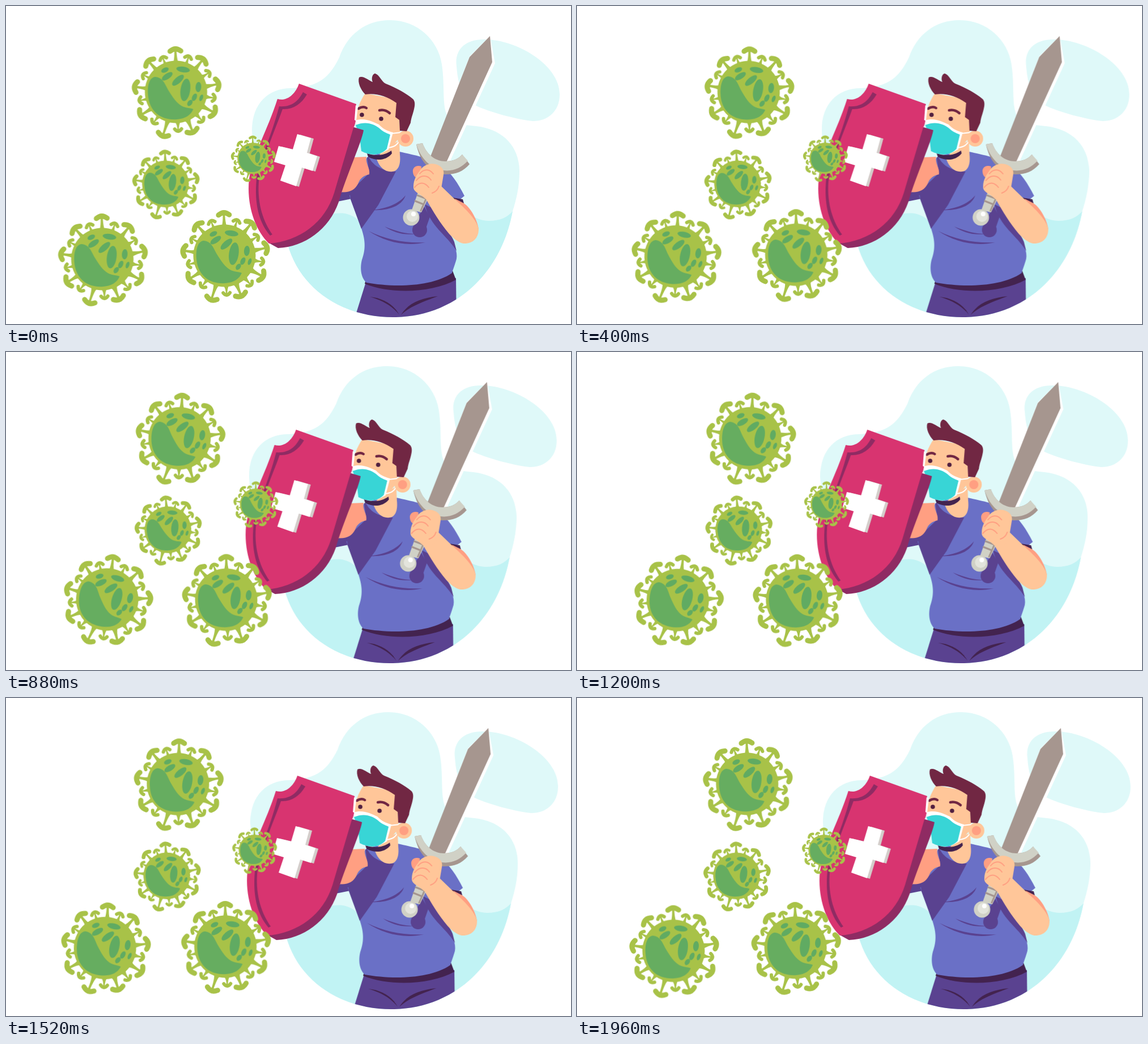
These frames come from a looping animation (997 px wide and 561 px high, 2 s). An HTML page:

```html
<!DOCTYPE html>
<html lang="en">
<head>
<meta charset="utf-8">
<title>Shield against viruses</title>
<style>
  html, body { margin: 0; width: 100%; height: 100%; overflow: hidden; background: #fff; }
  svg { display: block; width: 997px; height: 561px; }
  .sway { animation: sway 1s linear infinite alternate; }
  @keyframes sway {
    from { transform: translate(0, 0) rotate(0deg); }
    to { transform: translate(var(--dx), var(--dy)) rotate(var(--turn)); }
  }
  .skin { fill: #ffc699; }
  .blush { fill: #ff9f82; }
  .blue { fill: #6a70c6; }
  .purple { fill: #5a4290; }
  .plum { fill: #43234f; }
  .pink { fill: #d83470; }
  .wine { fill: #8f2b63; }
  .steel { fill: #a6968f; }
  .silver { fill: #d0d1c6; }
  .white { fill: #fff; }
  .line { fill: none; stroke-linecap: round; stroke-linejoin: round; }
</style>
</head>
<body>
<svg viewBox="0 0 997 561" xmlns="http://www.w3.org/2000/svg">
  <defs>
    <path id="blob" d="M434 220C434 172 463 145 503 145C553 143 571 125 588 91C602 50 635 25 677 25C727 25 766 62 770 110C774 145 770 170 777 190C784 209 805 209 830 212C875 217 906 246 906 292C906 318 901 340 894 362C873 475 790 549 683 549C592 549 518 498 497 420C480 375 436 270 434 220Z"/>
    <clipPath id="inBlob"><use href="#blob"/></clipPath>
    <path id="cross" d="M514 226L538 233L531 259L549 265L541 291L522 285L512 318L484 308L493 281L473 275L481 247L506 253Z"/>
    <g id="virus" fill="#a8c248" stroke="none">
      <g id="spikes"></g>
      <circle cx="-1.5" cy="-1.5" r="55"/>
      <path fill="#66ad60" d="M-38 -28C-49 -27 -52 -12 -51 3C-49 34 -27 49 0 47C15 46 25 39 29 29C22 26 14 28 5 21C-3 15 -10 4 -16 -6C-22 -18 -26 -27 -38 -28Z"/>
      <g id="spots" fill="#60ab62"></g>
    </g>
  </defs>

  <g class="sway" style="--dx:-6px;--dy:0px;--turn:0deg">
    <!-- backdrop -->
    <use href="#blob" fill="#dff9f9"/>
    <path clip-path="url(#inBlob)" fill="#c1f3f4" d="M470 450C520 385 560 362 598 366C625 372 632 390 636 410L788 335C808 365 830 379 852 379C872 379 885 373 896 360L930 561H470Z"/>
    <path fill="#dff9f9" d="M795 106C791 76 812 58 845 59C900 59 977 103 977 156C977 186 956 203 930 203C905 201 850 187 826 174C802 158 797 132 795 106Z"/>

    <!-- trousers -->
    <g clip-path="url(#inBlob)">
      <path class="purple" d="M636 484L617 545L640 561H795L794 480Z"/>
      <path class="plum" d="M642 513C665 515 685 527 694 545C682 529 663 519 642 513ZM762 512C732 515 710 524 697 545C712 530 738 521 762 512Z"/>
    </g>
    <path class="plum" d="M636 480L633 490C680 509 752 506 794 483L788 467Z"/>

    <!-- shirt -->
    <path class="purple" d="M606 320L585 333V345L610 340L630 300Z"/>
    <path class="blue" d="M637 267L655 261L694 257C720 263 750 268 768 282C786 294 797 312 809 335L795 346L752 357L785 410C791 420 797 434 795 446C792 457 789 464 787 471C750 497 680 496 636 488C625 478 625 460 628 448C636 426 633 410 627 392L606 335Z"/>
    <path class="purple" d="M637 267L641 295L622 313L606 325L608 341L627 393L657 351L688 292C660 291 646 279 640 266Z"/>
    <path class="purple" d="M739 350L754 357C765 383 786 401 791 416L795 432C778 404 748 389 739 350Z"/>
    <circle class="purple" cx="730" cy="395" r="13"/>
    <path class="purple" d="M720 384L738 354L748 372L741 392Z"/>
    <path class="purple" d="M644 360C670 358 692 350 705 334C700 350 680 362 644 360ZM640 397C670 412 705 419 740 417C705 425 668 416 640 397ZM668 389C690 398 706 402 723 402C702 405 685 400 668 389Z"/>

    <!-- arm behind the shield -->
    <path class="blush" d="M612 267L636 266C634 279 643 286 641 297C633 299 625 302 621 314C615 325 606 330 588 328Z"/>

    <!-- neck and head -->
    <path class="skin" d="M654 270C659 285 670 294 682 292C692 291 697 280 695 262L694 238L668 250Z"/>
    <path class="plum" d="M637 260C652 265 668 264 680 255L681 260C671 273 653 274 639 266Z"/>
    <path class="skin" d="M634 154C625 167 617 185 617 205L626 235L678 252L696 230L692 165Z"/>
    <path class="line" stroke="#fff" stroke-width="2" d="M680 225L697 223M674 250C685 249 692 244 694 236"/>
    <circle class="skin" cx="705" cy="234" r="14"/>
    <circle class="blush" cx="705" cy="234" r="8"/>
    <path fill="#712743" d="M634 156C626 148 620 135 623 126C630 122 639 131 647 134C644 127 647 120 651 119C659 121 662 133 670 137C690 145 706 154 718 164C722 168 722 174 720 182C718 191 715 197 714 206L707 221L695 220L694 201L687 196L689 171C672 158 650 153 634 156Z"/>
    <path class="line" stroke="#712743" stroke-width="4.5" d="M622 181Q630 176 636 180M659 184Q669 182 677 189"/>
    <circle cx="628" cy="192" r="3.8" fill="#512040"/>
    <circle cx="662" cy="199" r="3.8" fill="#512040"/>
    <path class="white" d="M616 202C633 196 648 205 658 209C665 217 674 221 683 223L675 253L662 260L620 218Z"/>
    <path fill="#38d5d6" d="M617 210C636 202 650 209 658 215C664 221 671 224 678 227L672 252C660 265 642 264 627 256L624 230Z"/>

    <!-- shield -->
    <path class="wine" d="M611 213L631 219C628 240 600 300 587 346C570 394 527 425 480 427L462 417L560 350Z"/>
    <path class="pink" d="M517 137L618 173C617 187 620 203 613 215L579 330C563 382 518 415 464 419C440 396 424 352 429 305C436 261 462 218 479 164C496 169 511 155 517 137Z"/>
    <path class="wine" d="M524 152L531 156C521 173 507 183 488 182C474 221 451 272 446 310C443 350 455 382 470 403L466 405C446 382 438 348 442 306C448 268 468 232 482 177C503 179 516 168 524 152Z"/>
    <path class="white" d="M617 175L621 178L618 203L615 201Z"/>
    <use href="#cross" x="5" y="1" fill="#d3cdca"/>
    <use href="#cross" class="white"/>

    <!-- sword arm -->
    <path class="plum" d="M788 338L806 341L808 348L797 352Z"/>
    <path class="blush" d="M792 340L808 348C820 356 832 378 834 394L815 390Z"/>
    <path class="skin" d="M765 315L792 341C810 357 832 378 834 394C834 410 823 420 807 419C797 417 789 409 782 402C766 383 754 363 742 342Z"/>

    <!-- sword -->
    <path class="white" d="M854 53L863 101L782 277L750 266L818 89Z"/>
    <path class="steel" d="M854 53L858 99L776 278L748 268L818 90Z"/>
    <path class="steel" d="M724 244L735 242C742 262 758 274 775 274C789 274 798 270 805 262L818 279C806 293 791 298 773 297C745 292 730 272 724 244Z"/>
    <path class="silver" d="M724 244L735 242C742 262 758 274 775 274C789 274 798 270 805 262L815 273C803 286 789 292 772 290C748 286 732 269 724 244Z"/>
    <path class="silver" d="M728 326L748 333L733 364L716 360Z"/>
    <path class="line" stroke="#a6968f" stroke-width="3" d="M726 334L742 340M722 344L737 350M744 334L732 361"/>
    <circle class="silver" cx="715" cy="373" r="14.5"/>
    <circle cx="717" cy="371" r="10" fill="#e3e4dc"/>
    <circle class="white" cx="719" cy="367" r="4"/>

    <!-- hand -->
    <path class="blush" d="M733 283C724 280 717 285 718 293C719 302 725 305 732 304Z"/>
    <path class="skin" d="M730 291C735 281 748 276 758 279C768 282 774 288 772 298L768 322C767 337 755 347 742 342C731 330 718 329 719 318C719 307 725 297 730 291Z"/>
    <path class="line" stroke="#ff9f82" stroke-width="2" d="M730 296C738 286 748 288 754 296M724 308C732 297 744 298 750 307M721 320C730 309 739 311 746 320M752 330C758 328 762 324 764 318"/>
  </g>

  <g id="swarm"></g>
</svg>
<script>
  const NS = 'http://www.w3.org/2000/svg';
  const add = (parent, tag, attrs) => {
    const el = document.createElementNS(NS, tag);
    for (const key in attrs) el.setAttribute(key, attrs[key]);
    return parent.appendChild(el);
  };
  const byId = id => document.getElementById(id);

  // A flared stalk with a bent, round-ended cap.
  function spike(angle, reach, half, thick) {
    const g = add(byId('spikes'), 'g', { transform: `rotate(${angle})` });
    const y = -reach + thick / 2 + 1;
    const w = half / 5;
    add(g, 'path', { d: `M${-w - 4} -51Q${-w} -56 ${-w} ${y}H${w}Q${w} -56 ${w + 4} -51Z` });
    add(g, 'path', {
      d: `M${-half} ${y + 3}Q0 ${y - 5} ${half} ${y + 3}`,
      fill: 'none', stroke: '#a8c248', 'stroke-width': thick, 'stroke-linecap': 'round'
    });
  }
  for (let k = 0; k < 9; k++) {
    spike(-2 + 40 * k, k === 0 ? 82 : k === 5 ? 85 : 80, 9.5, 9);
    spike(18 + 40 * k, 71, 6, 6);
  }

  // x, y, rx, ry, tilt
  const spots = [
    [11, -41, 12, 5, 8], [-17, -29, 11, 5, -35], [-21, -40, 7, 4, -25],
    [2, -22, 13, 5.5, -42], [15, -5, 8.5, 20, 8], [38, -10, 5, 9, 5],
    [31, 8, 4, 7, 25], [23, 18, 4, 6, 35], [43, 9, 3, 6, 20]
  ];
  for (const [x, y, rx, ry, tilt] of spots)
    add(byId('spots'), 'ellipse', { rx, ry, transform: `translate(${x} ${y}) rotate(${tilt})` });

  // x, y, size, then the sway: dx, dy, turn
  const swarm = [
    [301.5, 153, 1, 7, 1, 5],
    [282.5, 315, 0.75, 5, -0.5, -3.5],
    [387, 442, 1, 3.5, -4, 1],
    [171.5, 448, 1, 9.5, -11, 10],
    [436.5, 269.5, 0.5, 5, -0.3, 2]
  ];
  for (const [x, y, size, dx, dy, turn] of swarm) {
    const place = add(byId('swarm'), 'g', { transform: `translate(${x} ${y})` });
    const body = add(place, 'g', { class: 'sway', style: `--dx:${dx}px;--dy:${dy}px;--turn:${turn}deg` });
    add(body, 'use', { href: '#virus', transform: `scale(${size})` });
  }
</script>
</body>
</html>
```
